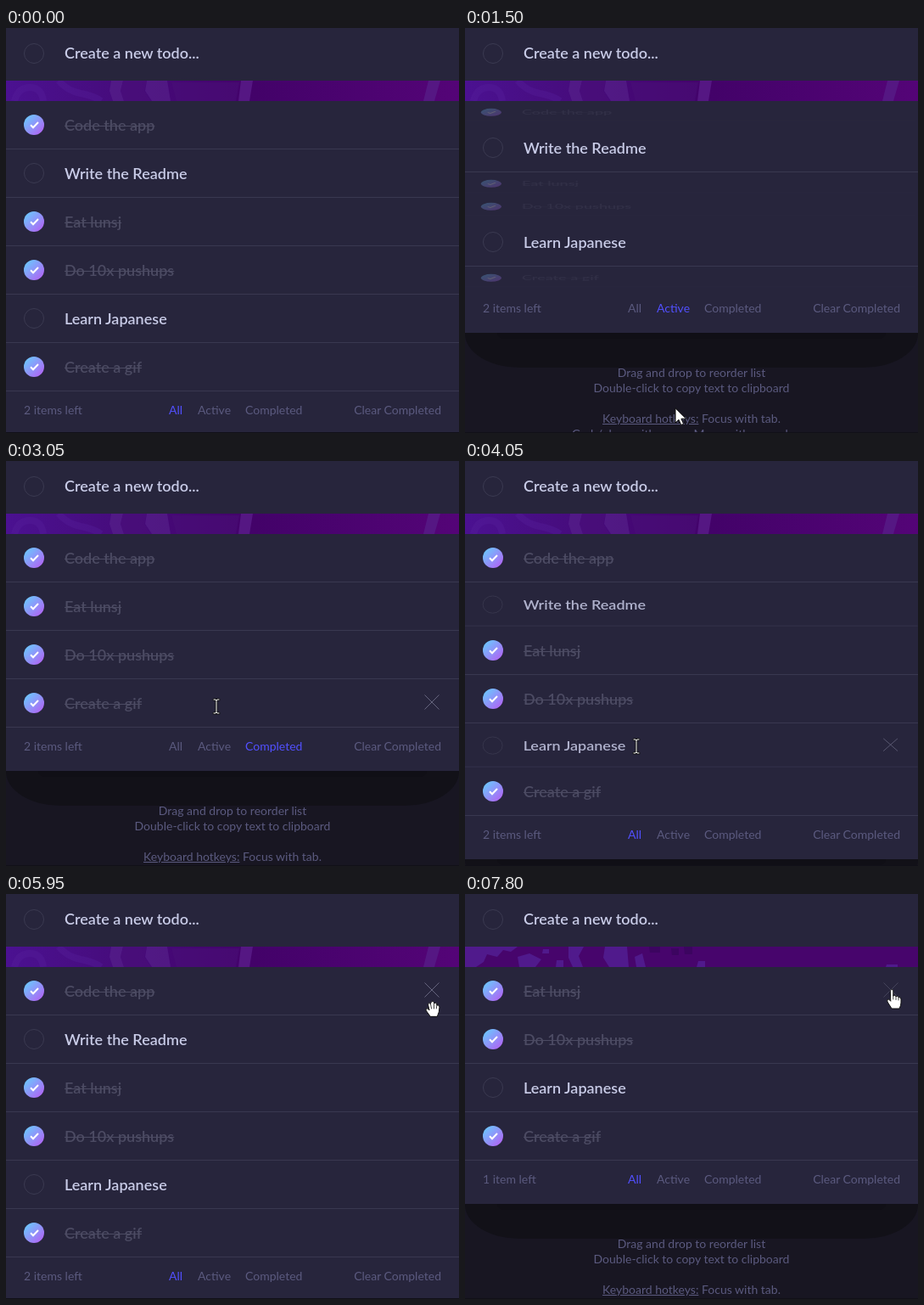
An HTML page that plays this animation: 534x477 px, repeating every 8 s.

```html
<!DOCTYPE html>
<html lang="en">
<head>
<meta charset="utf-8">
<title>Todo list</title>
<style>
  html, body { margin: 0; width: 100%; height: 100%; overflow: hidden; background: #181622; }
  #stage { position: relative; width: 534px; height: 477px; overflow: hidden;
    background: #181622; font: 14px Lato, sans-serif; color: #5b5a7f; }
  #stage > * { position: absolute; left: 0; }
  .card { width: 534px; background: #27253c; }
  #input { top: 0; height: 62px; }
  #banner { top: 62px; }
  #list { top: 86px; overflow: hidden; }
  .row { position: relative; overflow: hidden; }
  .body { position: absolute; left: 0; top: calc(50% - 28.5px); width: 534px; height: 57px; }
  .line { position: absolute; left: 0; bottom: 0; width: 100%; height: 1px; background: #393850; }
  .label { position: absolute; left: 69px; top: 0; line-height: 56px; font-size: 18px;
    font-weight: 600; color: #c8cbe7; white-space: nowrap; }
  #input .label { line-height: 59px; }
  .done .label { color: #4c4b63; text-decoration: line-through; text-decoration-thickness: 1px; }
  .ring { position: absolute; left: 21px; top: 16px; width: 24px; height: 24px;
    box-sizing: border-box; border: 1px solid #3b3a51; border-radius: 50%; }
  #input .ring { top: 18px; }
  .done .ring { border: 0; background: linear-gradient(135deg, #63d3ff, #b858f3); }
  .ring svg { display: none; position: absolute; left: 0; top: 0; }
  .done .ring svg { display: block; }
  .cross { position: absolute; left: 493px; top: 18px; stroke: #5f5e78; visibility: hidden; }
  #footer { height: 51px; line-height: 44px; }
  #footer span { position: absolute; top: 0; white-space: nowrap; }
  #shade { width: 534px; height: 41px; background: #121118; border-radius: 0 0 64px 64px / 0 0 40px 40px; }
  #shade::before { content: ""; position: absolute; left: 38px; right: 38px; top: 0; height: 7px;
    background: #100f16; border-radius: 0 0 12px 12px; }
  #help { width: 534px; text-align: center; line-height: 18px; }
  #edge { top: 476px; width: 534px; height: 1px; background: #111018; }
  #cursor { top: 0; overflow: visible; }
  #cursor g { fill: #fff; stroke: #111; stroke-linejoin: round; stroke-linecap: round; visibility: hidden; }
</style>
</head>
<body>
<div id="stage">
  <svg id="banner" width="534" height="24">
    <defs>
      <linearGradient id="purple">
        <stop offset="0" stop-color="#4b1191"/><stop offset=".2" stop-color="#470d80"/>
        <stop offset=".55" stop-color="#430269"/><stop offset="1" stop-color="#540477"/>
      </linearGradient>
    </defs>
    <g id="soft">
      <rect width="534" height="24" fill="url(#purple)"/>
      <g fill="none" stroke="#56209a" stroke-width="8" opacity=".35">
        <path d="M10 24Q14 8 28 8T44 24M62 0Q72 12 88 15T112 24"/>
      </g>
      <path d="M124 0h14l-3 12 4 12h-13l-4-12zM166 0h24l4 24h-22l-8-12z" fill="#59248c" opacity=".6"/>
      <path d="M138 0h28l-3 12 8 12h-32l-4-12zM195 2h80l-4 22h-70z" fill="#4a1078" opacity=".5"/>
      <path d="M277 0h14l-4 24h-13zM498 0h14l-7 24h-13z" fill="#551783"/>
    </g>
    <g id="flat">
      <rect width="534" height="24" fill="#47056c"/>
      <path d="M0 0h62l-8 6-9-2-7 8-12-3-4 9-9 6H0zM62 12l14-4 14 7-7 9H64zM122 0h18l-6 11 5 13h-12l-5-11zM165 0h26l2 24h-23l-7-11z" fill="#501a8c"/>
      <path d="M92 3h7v5h-8zM108 16h8v8h-9zM200 12l9-4 4 16h-11zM275 17h8v7h-10zM497 21h13v3h-14z" fill="#501a8c"/>
      <path d="M217 0h13v7h-12zM243 2h9v8h-8zM258 0h10v9h-9z" fill="#3c0560"/>
    </g>
  </svg>
  <div id="input" class="card"><div class="ring"></div><div class="label">Create a new todo...</div></div>
  <div id="shade"></div>
  <div id="help">Drag and drop to reorder list<br>Double-click to copy text to clipboard<br><br><u>Keyboard hotkeys:</u> Focus with tab.<br>Grab/place with space. Move with arrow keys.</div>
  <div id="list" class="card"></div>
  <div id="footer" class="card">
    <span id="count" style="left:21px"></span>
    <span class="tab" style="left:192px">All</span>
    <span class="tab" style="left:226px">Active</span>
    <span class="tab" style="left:282px">Completed</span>
    <span style="right:21px">Clear Completed</span>
  </div>
  <div id="edge"></div>
  <svg id="cursor" width="1" height="1">
    <g id="arrow"><path d="M0 0V17L4 13.3 6.8 19.5 9.6 18.3 6.9 12.2H12.3Z"/></g>
    <g id="beam"><path d="M-3-8H-1L0-7 1-8H3M0-7V7M-3 8H-1L0 7 1 8H3" fill="none" stroke-width="3"/>
      <path d="M-3-8H-1L0-7 1-8H3M0-7V7M-3 8H-1L0 7 1 8H3" fill="none" style="stroke:#fff"/></g>
    <g id="point"><path d="M-1.5 1.5Q0-1 1.8 1.5V8Q4 6.5 5 8.7 7 7.5 8 9.7 11 9 11 12V16Q11 19 9 23H0L-5 15Q-6 11.5-3.5 12L-1.5 14Z"/>
      <path d="M1.8 8V12M5 9V12.5M8 10V13" fill="none" stroke-width=".8"/></g>
    <g id="grab"><path d="M-3 9L-8 2Q-8.5-1-5.5 0L-4 2-5.5-5Q-4.5-8-2.5-5.5L-2-7.5Q0-10 1.5-7.5L2-6.5Q4-8 5-5L5-4Q7.5-5 8-2 8 4 5.5 9Z"/>
      <path d="M-2.5-5.5L-1.5 0M1.5-7L1.5 0M5-5L4.3 0" fill="none" stroke-width=".8"/></g>
  </svg>
</div>
<script>
const $ = id => document.getElementById(id);
const LOOP = 8000, STEP = 50, FADE = 450, ROW = 57, TOP = 86;
const HIDE_LAG = 20; // rows start leaving slightly after others start entering
const TO_ACTIVE = 1341, TO_DONE = 2418, TO_ALL = 3765, DEL_FIRST = 6480, DEL_SECOND = 7280;

// Each item flips between shown and hidden at its listed times.
const items = [
  ['Code the app', 1, [TO_ACTIVE, TO_DONE, DEL_FIRST]],
  ['Write the Readme', 0, [TO_DONE, TO_ALL, DEL_SECOND]],
  ['Eat lunsj', 1, [TO_ACTIVE, TO_DONE]],
  ['Do 10x pushups', 1, [TO_ACTIVE, TO_DONE]],
  ['Learn Japanese', 0, [TO_DONE, TO_ALL]],
  ['Create a gif', 1, [TO_ACTIVE, TO_DONE]]
].map(([text, done, flips]) => {
  const el = document.createElement('div');
  el.className = done ? 'row done' : 'row';
  el.innerHTML = `<div class="body"><div class="ring"><svg width="24" height="24"><path d="M8 12.3l3 3 6-6.3" fill="none" stroke="#fff" stroke-width="2"/></svg></div>
    <div class="label">${text}</div>
    <svg class="cross" width="18" height="18"><path d="M.5 .5l17 17M17.5 .5l-17 17"/></svg>
    <div class="line"></div></div>`;
  $('list').append(el);
  return { el, flips, body: el.firstChild, cross: el.querySelector('.cross') };
});

const tabs = [...document.querySelectorAll('.tab')];
const tabBox = [[192, 208], [226, 264], [282, 349]];

// time, x, y
const path = [
  [150, 330, -25], [850, 248, 448], [1650, 248, 448], [2050, 312, 224],
  [2800, 312, 224], [3250, 202, 336], [4500, 202, 336], [5350, 497, 113],
  [5400, 497, 113], [5650, 503, 174], [5750, 503, 174], [5950, 503, 135],
  [6300, 503, 112]
];

// The CSS "ease" curve.
function ease(x) {
  if (x <= 0) return 0;
  if (x >= 1) return 1;
  const bez = (s, a, b) => 3 * a * s * (1 - s) ** 2 + 3 * b * s * s * (1 - s) + s ** 3;
  let lo = 0, hi = 1;
  for (let i = 0; i < 24; i++) {
    const mid = (lo + hi) / 2;
    if (bez(mid, .25, .25) < x) lo = mid; else hi = mid;
  }
  return bez(lo, .1, 1);
}

function shown(flips, t) {
  return flips.reduce((v, at, i) => i % 2
    ? v + ease((t - at) / FADE)
    : v - ease((t - at - HIDE_LAG) / FADE), 1);
}

function cursorAt(t) {
  const i = path.findIndex(k => k[0] > t);
  if (i === 0) return path[0].slice(1);
  if (i < 0) return path[path.length - 1].slice(1);
  const [t0, x0, y0] = path[i - 1], [t1, x1, y1] = path[i];
  const u = (t - t0) / (t1 - t0), k = u * u * (3 - 2 * u);
  return [x0 + (x1 - x0) * k, y0 + (y1 - y0) * k];
}

function draw(t) {
  const [cx, cy] = cursorAt(t);
  let y = TOP, kind = 'arrow';
  if (cy < 62 && cx > 60) kind = 'beam';

  for (const { el, flips, body, cross } of items) {
    const p = Math.max(0, shown(flips, t)), h = Math.round(ROW * p);
    const over = cy >= y && cy < y + h;
    const onCross = over && Math.abs(cx - 502) < 10 && Math.abs(cy - y - h / 2) < 11;
    el.style.height = h + 'px';
    el.style.opacity = p ** 1.7;
    body.style.transform = p < 1 ? `translateX(${-4 * (1 - p)}px) scaleY(${p ** 1.3})` : 'none';
    cross.style.visibility = over ? 'visible' : 'hidden';
    cross.style.stroke = onCross ? '#45445b' : '#66657e';
    if (over) kind = onCross ? 'point' : cx > 68 && cx < 480 ? 'beam' : 'grab';
    y += h;
  }

  $('list').style.height = y - TOP + 'px';
  $('footer').style.top = y + 'px';
  $('shade').style.top = y + 51 + 'px';
  $('help').style.top = y + 89 + 'px';
  $('count').textContent = t < DEL_SECOND ? '2 items left' : '1 item left';

  const current = t < TO_ACTIVE || t >= TO_ALL ? 0 : t < TO_DONE ? 1 : 2;
  tabs.forEach((tab, i) => {
    const hot = cx >= tabBox[i][0] && cx <= tabBox[i][1] && Math.abs(cy - y - 23) < 9;
    if (hot) kind = 'point';
    tab.style.color = i === current ? '#5250ff' : hot ? '#c8cbe7' : '';
  });

  $('soft').style.visibility = t < DEL_FIRST ? 'visible' : 'hidden';
  $('flat').style.visibility = t < DEL_FIRST ? 'hidden' : 'visible';
  for (const id of ['arrow', 'beam', 'point', 'grab'])
    $(id).style.visibility = id === kind ? 'visible' : 'hidden';
  $('cursor').style.transform = `translate(${Math.round(cx)}px, ${Math.round(cy)}px)`;
}

const start = performance.now();
function tick() {
  const t = (performance.now() - start) % LOOP;
  draw(Math.floor(t / STEP) * STEP);
  requestAnimationFrame(tick);
}
tick();
</script>
</body>
</html>
```
